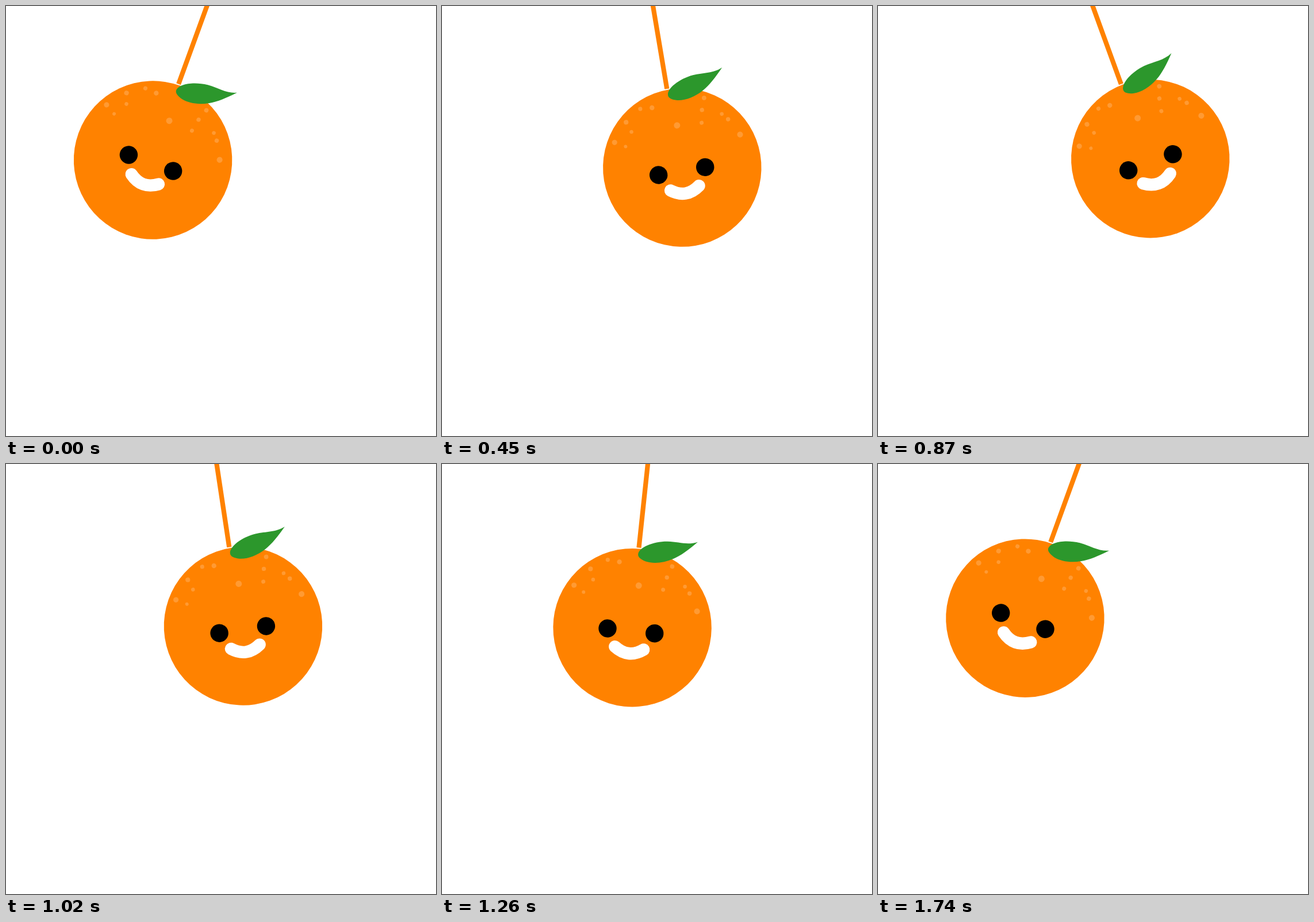
Recreate the animation shown at these times as an HTML page with a canvas. Size 748x748 px, loop 1.77 s.

```html
<!DOCTYPE html>
<html lang="en">
<head>
<meta charset="utf-8">
<title>Swinging orange</title>
<style>
  html, body { margin: 0; width: 100%; height: 100%; overflow: hidden; background: #fff; }
  canvas { display: block; width: 748px; height: 748px; }
</style>
</head>
<body>
<canvas id="stage" width="748" height="748"></canvas>
<script>
const ctx = document.getElementById('stage').getContext('2d');

const LOOP = 1770, STEP = 30;
const START = 5, TURN = 880, SWING = 20;
const PIVOT = [361.5, -32.9];
const CENTER = [3.4, 319];
const RADIUS = 137.75;
const ORANGE = '#ff8200', PORE = '#ff9a33', GREEN = '#2c972c';
const RAD = Math.PI / 180;

const leaf = new Path2D(
  'M-3.5-128C-3.5-140 20-153 45-155.5C65-157 80-152.5 97.3-160.2' +
  'C84-146 70-133 58-126.5C42-117.5 25-114 11-117C2-119.5-3.5-123-3.5-128Z');
const smile = new Path2D('M-26.6 36Q-1.5 54.5 23.6 36');

const bezier = (a, b, u) =>
  3 * (1 - u) * (1 - u) * u * a + 3 * (1 - u) * u * u * b + u * u * u;

// Quick start, soft stop
function ease(p) {
  let lo = 0, hi = 1;
  for (let i = 0; i < 30; i++) {
    const mid = (lo + hi) / 2;
    if (bezier(0.1, 0.548, mid) < p) lo = mid; else hi = mid;
  }
  return bezier(0.22, 1, lo);
}

function angleAt(ms) {
  const back = ms >= TURN;
  const p = back ? (ms - TURN) / (LOOP - TURN)
                 : Math.max(0, ms - START) / (TURN - START);
  return (back ? -1 : 1) * SWING * (1 - 2 * ease(p));
}

function disc(x, y, r, color) {
  ctx.fillStyle = color;
  ctx.beginPath();
  ctx.arc(x, y, r, 0, Math.PI * 2);
  ctx.fill();
}

// Angle is measured from the stem, clockwise
function pore(deg, dist, r) {
  disc(dist * Math.sin(deg * RAD), -dist * Math.cos(deg * RAD), r, PORE);
}

function pores() {
  pore(2.6, 74, 5.5);
  for (let k = 0; k < 3; k++) {
    const q = k * k;
    pore(-60 + 20 * k - 1.5 * q, 125.5, 4.6 - 0.5 * k);      // left rim
    pore(-60 + 8 * k + 6.7 * q, 105 + 2.9 * q, 3 + 0.3 * q); // left inner row
    pore(33 - 6 * k + 1.5 * q, 85 + 21 * k, 3.5 + 0.2 * k);  // right column
    pore(46 + 2.2 * k + 4.85 * q, 116, 3.3 + 0.45 * q);      // right rim
  }
}

function draw(ms) {
  ctx.fillStyle = '#fff';
  ctx.fillRect(0, 0, 748, 748);

  ctx.save();
  ctx.translate(...PIVOT);
  ctx.rotate(angleAt(ms) * RAD);

  ctx.fillStyle = ORANGE;
  ctx.fillRect(-4.1, 0, 8.2, 179.5);

  ctx.translate(...CENTER);
  disc(0, 0, RADIUS, ORANGE);
  pores();

  for (const side of [-1, 1]) disc(-1.6 + side * 41.1, 5.9, 15.7, '#000');

  ctx.strokeStyle = '#fff';
  ctx.lineWidth = 21.4;
  ctx.lineCap = 'round';
  ctx.stroke(smile);

  ctx.fillStyle = GREEN;
  ctx.fill(leaf);
  ctx.restore();
}

const begin = performance.now();
function tick() {
  const t = (performance.now() - begin) % LOOP;
  draw(Math.floor(t / STEP) * STEP);
  requestAnimationFrame(tick);
}
draw(0);
requestAnimationFrame(tick);
</script>
</body>
</html>
```
